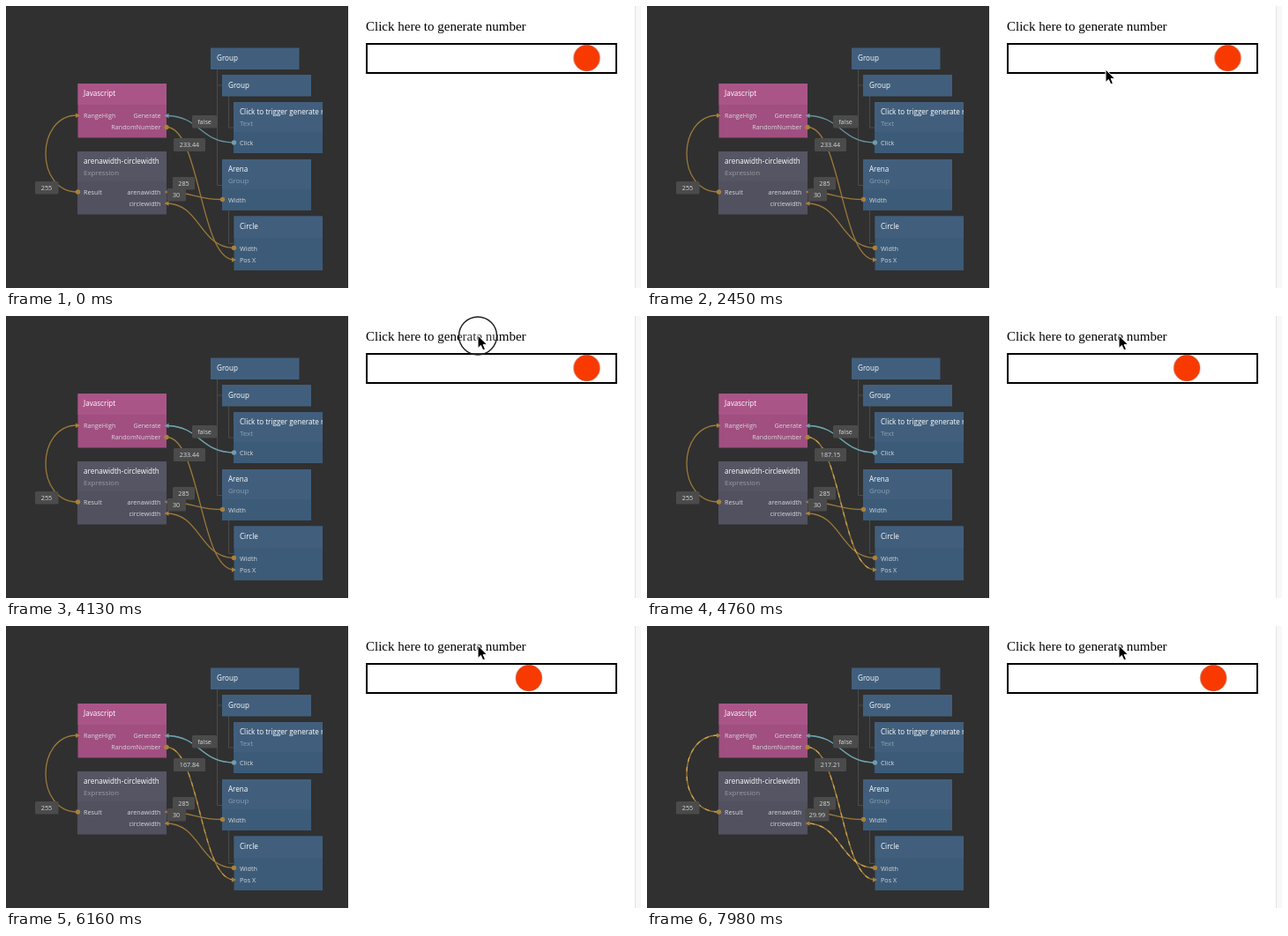
Recreate the animation shown at these times as an HTML page. Size 720 by 320 pixels, loop 8 s.

```html
<!DOCTYPE html>
<html lang="en">
<head>
<meta charset="utf-8">
<title>Random number node graph</title>
<style>
html, body { margin: 0; width: 100%; height: 100%; overflow: hidden; background: #fff; }
svg { display: block; }
text { font: 7.2px "Open Sans", sans-serif; fill: #d6d8dc; }
text.title { font-size: 8.1px; fill: #fff; }
text.type { font-size: 7.9px; fill: #fff; opacity: .4; }
text.page { font: 15px "Liberation Serif", "Times New Roman", serif; fill: #000; }
text.end { text-anchor: end; }
.tag rect { fill: #4b4b4b; }
.tag text { text-anchor: middle; }
.tree { fill: none; stroke: #4b4b4b; }
.wire { fill: none; stroke: #9b783a; stroke-width: 1.3; }
.wire.teal { stroke: #6794a0; }
.flow { fill: none; stroke: #dcae50; stroke-width: 1.3; stroke-dasharray: 5 6; opacity: 0; }
.dot { fill: #a9803a; }
.dot.teal { fill: #6f9dab; }

.ball { animation: ball 8s step-end infinite; }
.values { animation: values 8s step-end infinite; }
.ring { animation: ring 8s step-end infinite; }
.cursor { animation: cursor 8s infinite; }
.flow.random { animation: random 8s linear infinite, run .8s linear infinite; }
.flow.sizes { animation: sizes 8s linear infinite, run .8s linear infinite; }
.signal { animation: signal 8s linear infinite; }
.before { animation: before 8s step-end infinite; }
.after { animation: after 8s step-end infinite; }

@keyframes ball {
  0% { transform: translateX(233.44px); }
  52.5% { transform: translateX(187.15px); }
  63% { transform: translateX(170.99px); }
  70.875% { transform: translateX(167.84px); }
  88.3%, 100% { transform: translateX(217.21px); }
}
@keyframes values {
  0% { transform: translateY(0); }
  52.5% { transform: translateY(-20px); }
  63% { transform: translateY(-40px); }
  70.875% { transform: translateY(-60px); }
  88.3%, 100% { transform: translateY(-80px); }
}
@keyframes ring {
  0%, 52.5%, 63%, 70.875%, 88.3%, 100% { opacity: 0; }
  50.75%, 61.25%, 69.125%, 84.875% { opacity: 1; }
}
@keyframes cursor {
  0%, 21.5% { transform: translate(500px, 324px); animation-timing-function: ease-out; }
  29.5%, 36% { transform: translate(520px, 72px); animation-timing-function: ease-in-out; }
  41%, 100% { transform: translate(535px, 22px); }
}
@keyframes random {
  0%, 52.4% { opacity: 0; }
  52.5% { opacity: 1; }
  62.9% { opacity: .7; }
  63% { opacity: .9; }
  70.8% { opacity: .6; }
  70.875% { opacity: .9; }
  87% { opacity: .15; }
  88.2% { opacity: .1; }
  88.3% { opacity: 1; }
  100% { opacity: .8; }
}
@keyframes sizes {
  0%, 94.4% { opacity: 0; }
  94.5%, 100% { opacity: .9; }
}
@keyframes signal {
  0%, 50.7% { opacity: 0; }
  50.75%, 100% { opacity: .6; }
}
@keyframes run { to { stroke-dashoffset: -11px; } }
@keyframes before { 0% { opacity: 1; } 94.5%, 100% { opacity: 0; } }
@keyframes after { 0% { opacity: 0; } 94.5%, 100% { opacity: 1; } }
</style>
</head>
<body>
<svg width="720" height="320" viewBox="0 0 720 320">
  <defs>
    <clipPath id="textNode"><rect x="258" y="109" width="101" height="58"/></clipPath>
    <path id="range" d="M81 211C33 211 33 124 81 124"/>
    <path id="click" d="M258.500 155C220 155 220 124.500 182 124.500"/>
    <path id="number" d="M182 137.500C220 137.500 220 288 258.500 288"/>
    <path id="arena" d="M245.500 219.500C214 219.500 214 211 182 211"/>
    <path id="width" d="M258.500 274.500C220 274.500 220 224 182 224"/>
  </defs>

  <rect width="388" height="320" fill="#303030"/>
  <path class="tree" d="M239.500 72V203.500H245M239.500 90H245M252.500 102V138H258M252.500 232V269.500H258"/>

  <g>
    <rect x="81.500" y="88" width="100.500" height="61.500" fill="#a04f80"/>
    <rect x="81.500" y="88" width="100.500" height="24" fill="#aa5588"/>
    <text class="title" x="88" y="102">Javascript</text>
    <text x="88" y="127">RangeHigh</text>
    <text class="end" x="175.500" y="127">Generate</text>
    <text class="end" x="175.500" y="140">RandomNumber</text>
  </g>
  <g>
    <rect x="81" y="165" width="101" height="71.500" fill="#525160"/>
    <rect x="81" y="165" width="101" height="34" fill="#565564"/>
    <text class="title" x="88" y="179">arenawidth-circlewidth</text>
    <text class="type" x="88" y="192">Expression</text>
    <text x="88" y="214">Result</text>
    <text class="end" x="175.500" y="214">arenawidth</text>
    <text class="end" x="175.500" y="227">circlewidth</text>
  </g>
  <g>
    <rect x="232" y="47.500" width="100.500" height="24.500" fill="#415f7d"/>
    <text class="title" x="239" y="61.500">Group</text>
    <rect x="245" y="78" width="101" height="24.500" fill="#415f7d"/>
    <text class="title" x="252" y="92.500">Group</text>
  </g>
  <g clip-path="url(#textNode)">
    <rect x="258" y="109" width="101" height="58" fill="#3c5b78"/>
    <rect x="258" y="109" width="101" height="34" fill="#415f7d"/>
    <text class="title" x="265" y="123">Click to trigger generate random</text>
    <text class="type" x="265" y="136">Text</text>
    <text x="265" y="158">Click</text>
  </g>
  <g>
    <rect x="245" y="174" width="101" height="58" fill="#3c5b78"/>
    <rect x="245" y="174" width="101" height="34" fill="#415f7d"/>
    <text class="title" x="252" y="188">Arena</text>
    <text class="type" x="252" y="201">Group</text>
    <text x="252" y="222.500">Width</text>
  </g>
  <g>
    <rect x="258.500" y="238.500" width="100.500" height="61.500" fill="#3c5b78"/>
    <rect x="258.500" y="238.500" width="100.500" height="25" fill="#415f7d"/>
    <text class="title" x="265" y="252.500">Circle</text>
    <text x="265" y="277.500">Width</text>
    <text x="265" y="291">Pos X</text>
  </g>

  <use href="#range" class="wire"/>
  <use href="#click" class="wire teal"/>
  <use href="#number" class="wire"/>
  <use href="#arena" class="wire"/>
  <use href="#width" class="wire"/>
  <use href="#click" class="wire signal" style="stroke:#74b0ba"/>
  <use href="#range" class="flow sizes"/>
  <use href="#number" class="flow random"/>
  <use href="#width" class="flow sizes"/>

  <circle class="dot" cx="81.500" cy="211" r="2.700"/>
  <circle class="dot" cx="182" cy="137.500" r="2.700"/>
  <circle class="dot" cx="245.500" cy="219.500" r="2.700"/>
  <circle class="dot" cx="258.500" cy="274.500" r="2.700"/>
  <circle class="dot teal" cx="258.500" cy="155" r="2.700"/>
  <path class="dot" d="M79 121.500l5 2.700l-5 2.700zM256 285.300l5 2.700l-5 2.700zM184.500 208.300l-5 2.700l5 2.700zM184.500 221.300l-5 2.700l5 2.700z"/>
  <path class="dot teal" d="M184.500 121.800l-5 2.700l5 2.700z"/>

  <g class="tag"><rect x="211" y="124" width="28" height="14.500" rx="1.500"/><text x="225" y="134">false</text></g>
  <g class="tag"><rect x="33" y="199" width="26.500" height="14.500" rx="1.500"/><text x="46" y="208.800">255</text></g>
  <g class="tag"><rect x="189" y="194" width="25" height="14.500" rx="1.500"/><text x="201.500" y="203.800">285</text></g>
  <g class="tag before"><rect x="182.500" y="207" width="21.500" height="14.500" rx="1.500"/><text x="193" y="217.200">30</text></g>
  <g class="tag after"><rect x="179.500" y="207" width="27" height="14.500" rx="1.500"/><text x="193" y="217.200">29.99</text></g>
  <svg class="tag" x="190" y="150" width="36" height="15" overflow="hidden">
    <rect width="36" height="15" rx="1.500"/>
    <g class="values">
      <text x="18" y="10.200">233.44</text>
      <text x="18" y="30.200">187.15</text>
      <text x="18" y="50.200">170.99</text>
      <text x="18" y="70.200">167.84</text>
      <text x="18" y="90.200">217.21</text>
    </g>
  </svg>

  <rect x="388" width="332" height="320" fill="#fff"/>
  <rect x="713" width="7" height="320" fill="#f8f8f8"/>
  <path d="M713.500 0V320" stroke="#e2e2e2"/>
  <text class="page" x="408" y="28">Click here to generate number</text>
  <rect x="409" y="43" width="283" height="33" fill="#fff" stroke="#000" stroke-width="2"/>
  <circle class="ball" cx="425" cy="59" r="14.800" fill="#f93a00" stroke="#b9452a" stroke-width=".6"/>
  <circle class="ring" cx="535" cy="22.500" r="21.500" fill="#fff" fill-opacity=".2" stroke="#1c1c1c" stroke-width="1.400"/>
  <path class="cursor" d="M0 0V14.500L3.400 11.400L5.800 16.800L8.400 15.700L6.100 10.400H10.600Z" fill="#000" stroke="#fff" stroke-width="1"/>
</svg>
</body>
</html>
```
